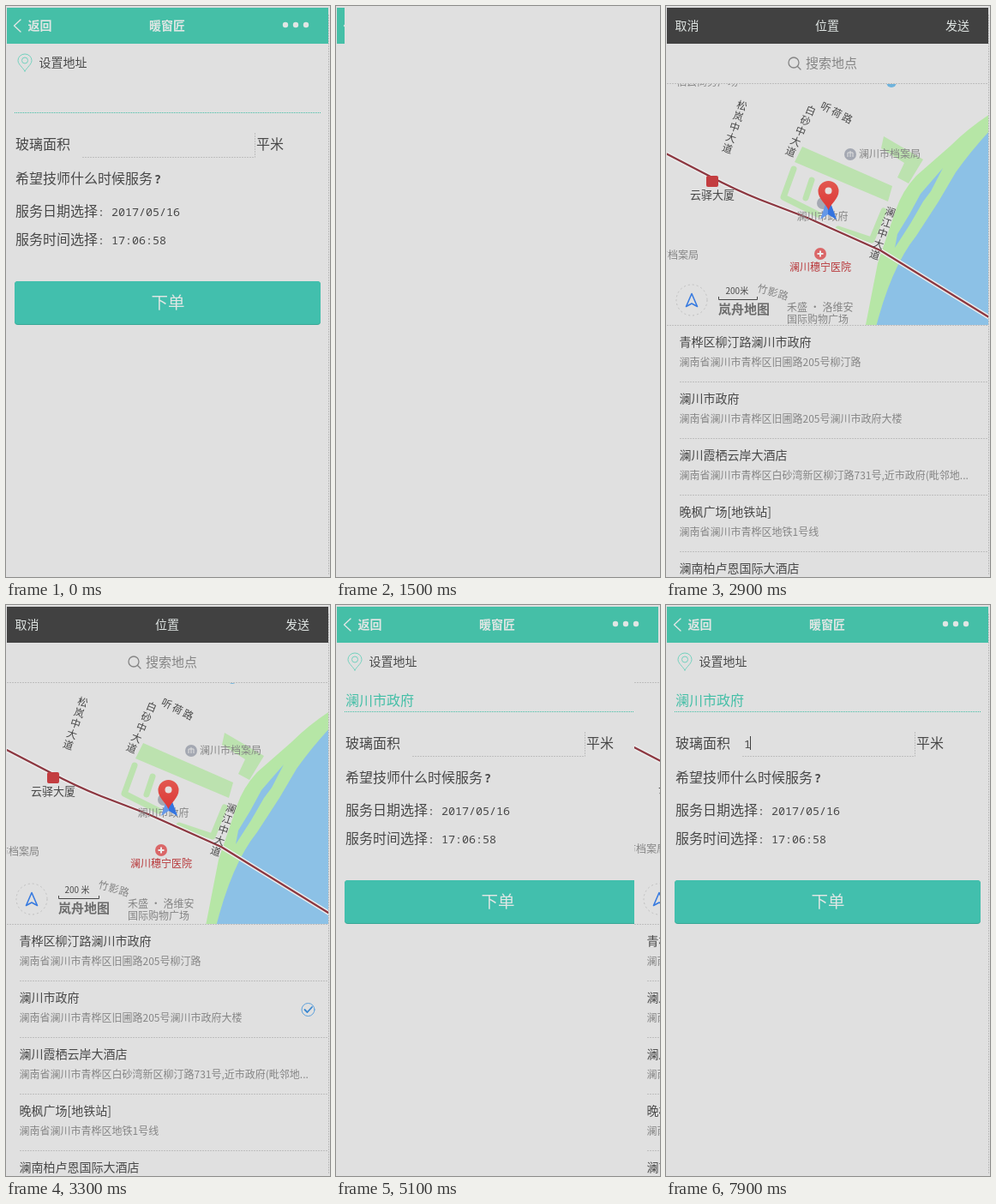
Animation of 378 by 666 pixels, one loop 8000 ms. Source, as an HTML page:

```html
<!DOCTYPE html>
<html lang="zh-CN">
<head>
<meta charset="utf-8">
<title>选择服务地址</title>
<style>
  html, body { margin: 0; width: 100%; height: 100%; overflow: hidden; background: #e0e0e0; }
  svg { display: block; width: 378px; height: 666px; }
  text { font-family: "Noto Sans CJK SC", "Noto Sans CJK", sans-serif; white-space: pre; fill: #484848; }
  .s10 { font-size: 10px; } .s12 { font-size: 12px; } .s13 { font-size: 13px; }
  .s14 { font-size: 14px; } .s15 { font-size: 15px; } .s16 { font-size: 16px; }
  .mono { font-family: "Noto Sans Mono", "DejaVu Sans Mono", monospace; font-size: 13.33px; }
  .bar { fill: #e0e6e4; }
  .grey { fill: #858585; }
  .road { text-anchor: middle; dominant-baseline: central; }
  .rule { fill: none; stroke: #bebebe; stroke-dasharray: 2 1; }
  .line { fill: none; stroke-linecap: round; stroke-linejoin: round; }
</style>
</head>
<body>
<svg viewBox="0 0 378 666">
  <defs>
    <clipPath id="mapArea"><rect x="1" y="91" width="375" height="281"/></clipPath>
    <linearGradient id="pinRed" x2="0" y2="1">
      <stop stop-color="#e2574f"/><stop offset="1" stop-color="#dc3836"/>
    </linearGradient>
    <linearGradient id="spinBlue" gradientUnits="userSpaceOnUse" x1="-14" y1="0" x2="17" y2="8">
      <stop stop-color="#3a8ae2"/><stop offset="1" stop-color="#3a8ae2" stop-opacity="0"/>
    </linearGradient>
    <path id="metro" d="M-4 170L50 198Q80 214 110 226L165 247L250 285L380 365"/>
  </defs>
  <rect width="378" height="666" fill="#e0e0e0"/>

  <g id="form">
    <path class="line" d="M22 76C19 71 14 68 14 63.500a8 7.500 0 0 1 16 0C30 68 25 71 22 76Z" stroke="#74d2bf"/>
    <circle cx="22" cy="63.500" r="3.500" fill="none" stroke="#74d2bf"/>
    <text class="s14" x="38.500" y="71">设置地址</text>
    <text class="s16" id="address" x="11" y="117" style="fill:#45bfa7">澜川市政府</text>
    <path d="M10 124.500H367" stroke="#45bfa7" stroke-dasharray="1 1"/>
    <text class="s16" x="11" y="167">玻璃面积</text>
    <path class="rule" d="M89 176.500H290.500V147"/>
    <text class="s16" x="292" y="167">平米</text>
    <text class="mono" id="digit" x="91" y="167">1</text>
    <path id="caret" d="M.5 153V169" stroke="#404040"/>
    <text class="s16" x="11" y="207">希望技师什么时候服务</text>
    <text class="mono" x="173" y="207" font-weight="bold">?</text>
    <text class="s16" x="11" y="245">服务日期选择</text>
    <text class="mono" x="107" y="245">: 2017/05/16</text>
    <text class="s16" x="11" y="278">服务时间选择</text>
    <text class="mono" x="107" y="278">: 17:06:58</text>
    <rect x="10" y="321" width="357" height="51" rx="4" fill="#38a896"/>
    <rect x="10" y="321" width="357" height="50" rx="4" fill="#42bfad"/>
    <text class="bar" x="169.500" y="353" font-size="19.500" font-weight="300">下单</text>
  </g>

  <g id="picker">
    <rect x="1" y="2" width="378" height="664" fill="#e0e0e0"/>
    <rect x="1" y="2" width="375" height="42" fill="#414141"/>
    <text class="bar s14" x="10.500" y="28">取消</text>
    <text class="bar s14" x="174" y="28">位置</text>
    <text class="bar s14" x="326" y="28">发送</text>
    <g transform="translate(1 44)"><rect id="progress" width="375" height="2" fill="#42b548"/></g>

    <g id="search">
      <path class="line" d="M143 66a6 6 0 1 0 12 0a6 6 0 1 0 -12 0M153.500 70.500L157 74" stroke="#858585" stroke-width="1.300"/>
      <text class="grey s15" x="163" y="72">搜索地点</text>
      <path class="rule" d="M1 90.500H376"/>
    </g>

    <g clip-path="url(#mapArea)">
      <g id="map">
        <path d="M378 126Q352 143 332 163L292 198Q276 215 268 238L247 300L231 382H378Z" fill="#b6e6a6"/>
        <path d="M378 145Q355 170 338 194L318 228L292 268Q262 305 243 382H378Z" fill="#8cc1e6"/>
        <path d="M323 189L309 216L300 228L285 254L267 282L270 266L284 243L297 219Z" fill="#8cc1e6"/>
        <g fill="#bce2af">
          <path d="M159 164L264 210L259 228L150 182Z"/>
          <path d="M254 152L300 179L283 207L270 200L278 183L251 166Z"/>
        </g>
        <path class="line" d="M149 190L137 223L177 243M170 203L163 224M201 260L240 273L254 239M188 213L184 229" stroke="#bce2af" stroke-width="7"/>
        <use href="#metro" class="line" stroke="#ededed" stroke-width="5"/>
        <use href="#metro" class="line" stroke="#8c3740" stroke-width="2.200"/>
        <g id="roads"></g>

        <text class="grey s12" x="12" y="93">栖云商务广场</text>
        <circle cx="263" cy="89" r="6" fill="#6fb3dc"/>
        <circle cx="215" cy="173" r="7" fill="#a4a8b2"/>
        <path d="M212 176V171H218V176M215 169V176" stroke="#e0e0e0" fill="none"/>
        <text class="grey s12" x="225" y="177">澜川市档案局</text>
        <rect x="47" y="198" width="14" height="13" rx="2" fill="#c33d40"/>
        <text class="s13" x="28" y="225" font-weight="500">云驿大厦</text>
        <circle cx="183" cy="230" r="7" fill="#a4a8b2"/>
        <text class="grey s12" x="152.500" y="250">澜川市政府</text>
        <path d="M189 222L199 249L189 243L180 249Z" fill="#6598e8"/>
        <path d="M189 222L199 249L189 243Z" fill="#3474df"/>
        <circle cx="180" cy="289" r="7" fill="#da6768"/>
        <path d="M176.500 289H183.500M180 285.500V292.500" stroke="#eee" stroke-width="2"/>
        <text class="s12" x="144" y="309" style="fill:#b8383b">澜川穗宁医院</text>
        <text class="grey s12" x="-10" y="295">市档案局</text>
        <text class="grey s12" x="141" y="356">禾盛 · 洛维安</text>
        <text class="grey s12" x="141" y="370">国际购物广场</text>
        <circle cx="178" cy="382" r="7" fill="#8f80d2"/>
      </g>
    </g>

    <g id="controls">
      <circle cx="30" cy="315" r="18" fill="#e0e0e0" stroke="#bebebe" stroke-dasharray="2 3"/>
      <path class="line" d="M30 307.500L36.500 322.500L30 319L23.500 322.500Z" stroke="#387be0" stroke-width="1.600"/>
      <g id="scaleTight">
        <text class="s10" x="69.500" y="308">200米</text>
        <path d="M61.500 311V314.500H106.500V311" fill="none" stroke="#484848"/>
      </g>
      <g id="scaleWide">
        <text class="s10" x="68.500" y="308">200 米</text>
        <path d="M61.500 311V314.500H108.500V311" fill="none" stroke="#484848"/>
      </g>
      <text class="s15" x="61" y="331" font-weight="700" style="fill:#6c6c6c">岚舟地图</text>
    </g>
    <g id="pin">
      <path d="M189.500 238C186.500 230 177.500 225 177.500 216a12 12 0 0 1 24 0C201.500 225 192.500 230 189.500 238Z" fill="url(#pinRed)"/>
      <circle cx="189.500" cy="215.500" r="4" fill="#e6dedd"/>
    </g>

    <g id="firstRow"></g>
    <g id="loading">
      <path class="rule" d="M1 344.500H376"/>
      <path class="line" d="M156 461.500a9.500 9.500 0 0 0 0 19" stroke="#777"/>
      <text class="grey s14" x="179" y="476">加载中...</text>
    </g>
    <g id="moreRows"><path class="rule" d="M1 372.500H376"/></g>
    <g id="check" class="line" stroke="#3a87cf">
      <circle cx="352.500" cy="472" r="7.500" stroke="#5b9fdb"/>
      <path d="M348.500 472L351.500 475L357 469" stroke-width="1.800"/>
    </g>
    <g transform="translate(187 356)">
      <path id="spinner" class="line" d="M1 -17A17 17 0 1 0 15 8" stroke="url(#spinBlue)" stroke-width="2"/>
    </g>
  </g>

  <g id="formBar">
    <rect width="378" height="44" fill="#e0e0e0"/>
    <rect x="1" y="2" width="375" height="42" fill="#45bfa7"/>
    <path class="line" d="M17 16L9.500 23L17 30" stroke="#e0e6e4" stroke-width="1.400"/>
    <text class="bar s14" x="25.500" y="28" font-weight="700">返回</text>
    <text class="bar s14" x="167" y="28" font-weight="700">暖窗匠</text>
    <g class="bar"><circle cx="326" cy="22" r="3.200"/><circle cx="338" cy="22" r="3.200"/><circle cx="350" cy="22" r="3.200"/></g>
  </g>
  <path id="edge" class="rule" d="M376.500 10V663"/>
  <rect id="blank" x="10" width="368" height="666" fill="#e0e0e0"/>
</svg>
<script>
  const LOOP = 8000;
  const $ = id => document.getElementById(id);

  // Street names: text, first character's centre, step per character, tilt
  const roads = [
    ['松岚中大道', 89, 115, -4.3, 12.5, 18],
    ['白砂中大道', 169, 121, -5.8, 12, 22],
    ['听荷路', 187, 117, 12.5, 6.5, 26],
    ['澜江中大道', 262, 239, -4.5, 12.5, 18],
    ['竹影路', 113, 329, 12, 3.5, 16, 'grey'],
  ];
  $('roads').innerHTML = roads.map(([name, x, y, dx, dy, tilt, tone = '']) =>
    [...name].map((char, i) =>
      `<text class="road s12 ${tone}" transform="translate(${x + i * dx} ${y + i * dy}) rotate(${tilt})">${char}</text>`
    ).join('')).join('');

  const district = '澜南省澜川市青桦区';
  const places = [
    ['青桦区柳汀路澜川市政府', '旧圃路205号柳汀路'],
    ['澜川市政府', '旧圃路205号澜川市政府大楼'],
    ['澜川霞栖云岸大酒店', '白砂湾新区柳汀路731号,近市政府(毗邻地...'],
    ['晚枫广场[地铁站]', '地铁1号线'],
    ['澜南柏卢恩国际大酒店', '柳汀路'],
  ];
  places.forEach(([title, detail], i) => {
    const y = 372 + i * 66;
    $(i ? 'moreRows' : 'firstRow').innerHTML +=
      `<text class="s14" x="15.5" y="${y + 25}">${title}</text>
       <text class="grey s12" x="15.5" y="${y + 48}">${district}${detail}</text>
       <path class="rule" d="M16 ${y + 66.5}H376"/>`;
  });

  // Each value holds from its time until the next one
  function play(id, prop, steps) {
    const frames = steps.map(([time, value]) => ({ offset: time / LOOP, [prop]: value, easing: 'step-end' }));
    frames.push({ offset: 1, [prop]: steps.at(-1)[1] });
    $(id).animate(frames, { duration: LOOP, iterations: Infinity });
  }
  // Times at which a part turns on, off, on, ...
  const show = (id, ...times) =>
    play(id, 'opacity', [...(times[0] ? [[0, 0]] : []), ...times.map((t, i) => [t, 1 - i % 2])]);
  const move = (id, ...steps) =>
    play(id, 'transform', steps.map(([t, x, y]) => [t, `translate(${x}px, ${y}px)`]));

  show('formBar', 0, 1700, 5100);
  show('blank', 1500, 1700);
  show('edge', 0, 500, 1700, 5100, 6300);
  show('picker', 1700, 6300);
  show('search', 2500);
  show('map', 2900);
  show('controls', 2100);
  show('pin', 2100);
  show('firstRow', 2500);
  show('loading', 2500, 2700);
  show('moreRows', 2700);
  show('check', 3300);
  show('spinner', 2100, 2700);
  show('scaleTight', 0, 3300);
  show('scaleWide', 3300);
  show('address', 5100);
  show('caret', 6500, 7500, 7900);
  show('digit', 7900);

  move('picker', [0, 0, 0], [5100, 347, 0]);
  move('map', [0, 0, 0], [3300, 1, -3], [4500, 1, -6]);
  move('controls', [0, 0, 0], [2700, 0, 28]);
  move('pin', [0, 0, 0], [4500, 0, -20], [4700, 0, -2], [4900, 0, 0]);
  move('caret', [0, 90, 0], [7900, 98, 0]);
  play('spinner', 'transform', [[0, 'rotate(-60deg)'], [2300, 'rotate(-30deg)'], [2500, 'rotate(0deg)']]);
  play('progress', 'transform', [[0, 0], [1900, 67], [2100, 30], [2700, 375], [2900, 0]]
    .map(([t, width]) => [t, `scaleX(${width / 375})`]));
</script>
</body>
</html>
```
